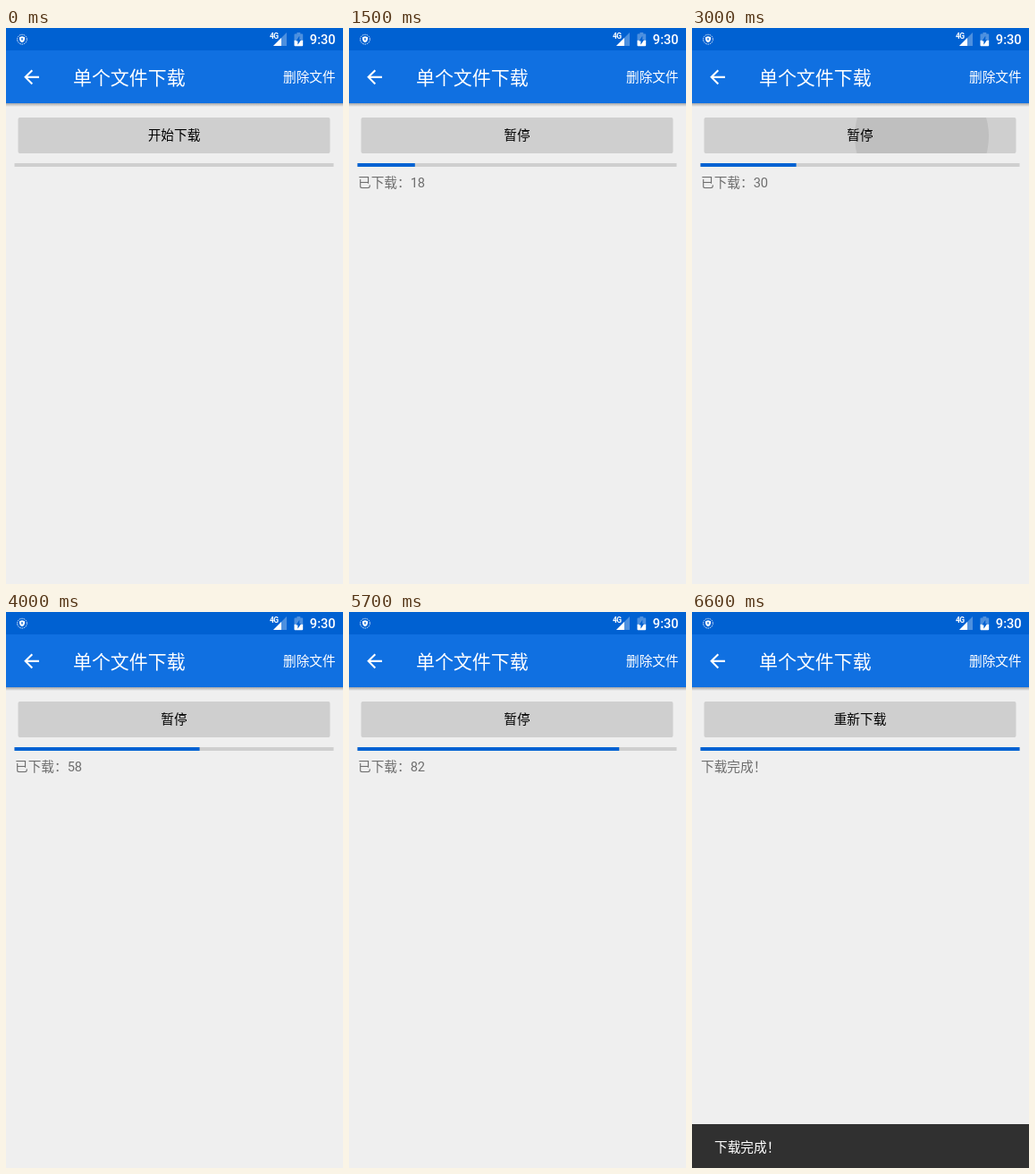
An HTML page that plays this animation: 377 px wide and 621 px high, repeating every 6.7 s.

```html
<!DOCTYPE html>
<html lang="zh-CN">
<head>
<meta charset="utf-8">
<title>单个文件下载</title>
<style>
  html, body { margin: 0; width: 100%; height: 100%; overflow: hidden; background: #efefef; }
  svg { display: block; width: 377px; height: 621px; }
  text { font: 14.66px Roboto, "Noto Sans CJK SC", "Noto Sans CJK", sans-serif; }
  .white { fill: #fff; }
  .faint { fill: #fff; opacity: .3; }
  #title { font-size: 20.94px; }
  #clock { font-weight: 500; }
  #net { font-size: 8.5px; font-weight: 700; letter-spacing: -.7px; }
  #label { font-weight: 500; text-anchor: middle; }
  #status { fill: #6e6e6e; }
</style>
</head>
<body>
<svg viewBox="0 0 377 621">
  <defs>
    <linearGradient id="shade" x2="0" y2="1">
      <stop offset="0" stop-opacity=".3"/>
      <stop offset="1" stop-opacity="0"/>
    </linearGradient>
    <clipPath id="face"><rect x="13.5" y="100" width="349" height="40" rx="2"/></clipPath>
  </defs>
  <rect width="377" height="621" fill="#efefef"/>

  <!-- status bar -->
  <rect width="377" height="25" fill="#0061d2"/>
  <circle cx="18" cy="12.7" r="5.4" fill="none" stroke="#fff" stroke-opacity=".8" stroke-dasharray="1.6 .8"/>
  <path class="white" d="M18 9.2l3 1.1v2.3q0 2.4-3 3.7q-3-1.3-3-3.7v-2.3z"/>
  <path d="M18 11v3M16.8 12.2h2.4" stroke="#0061d2" stroke-width=".8"/>
  <path class="faint" d="M314 5v15h-15z"/>
  <path class="white" d="M308 11v9h-9z"/>
  <text id="net" class="white" x="295" y="12">4G</text>
  <g transform="translate(315.7 3.5) scale(.97 .76)">
    <path class="faint" d="M17 5.33C17 4.6 16.4 4 15.67 4H14V2h-4v2H8.33C7.6 4 7 4.6 7 5.33v8.17h2.53L13 7v5.5h2l-.53 1H17z"/>
    <path class="white" d="M14.47 13.5L11 20v-5.5H9l.53-1H7v7.17C7 21.4 7.6 22 8.33 22h7.33c.74 0 1.34-.6 1.34-1.33V13.5z"/>
  </g>
  <text id="clock" class="white" x="339.8" y="18.2">9:30</text>

  <!-- toolbar -->
  <rect y="25" width="377" height="59" fill="#1070e1"/>
  <rect y="84" width="377" height="4" fill="url(#shade)"/>
  <path class="white" transform="translate(16 42.3) scale(1.047)"
        d="M20 11H7.83l5.59-5.59L12 4l-8 8 8 8 1.41-1.41L7.83 13H20z"/>
  <text id="title" class="white" x="75" y="62.6">单个文件下载</text>
  <text class="white" x="310" y="60.2">删除文件</text>

  <!-- download controls -->
  <g clip-path="url(#face)">
    <rect id="button" x="13" y="100" width="350" height="40" fill="#cfcfcf"/>
    <circle id="ripple" cx="257" cy="121" r="75" fill="#bfbfbf"/>
  </g>
  <text id="label" x="188" y="125.2"></text>
  <rect x="9.5" y="151" width="357" height="4" fill="#cfcfcf"/>
  <rect id="bar" x="9.5" y="151" width="0" height="4" fill="#0062d2"/>
  <text id="status" x="10" y="177.5"></text>

  <g id="snack">
    <rect y="572" width="377" height="49" fill="#303030"/>
    <text class="white" x="25" y="602.5">下载完成！</text>
  </g>
</svg>
<script>
  const LOOP = 6700, STEP = 100, DONE = 6300;
  const $ = id => document.getElementById(id);
  const within = (t, a, b) => t >= a && t < b;

  // Each run: start time, first percent, last percent, percent per step
  const runs = [[900, 0, 30, 3], [3000, 30, 64, 2.8], [5200, 64, 100, 3.6]];
  const slide = { 6400: 36, 6500: 2, 6600: 0 };

  function percent(t) {
    const run = runs.filter(r => t >= r[0]).pop();
    if (!run) return 0;
    const [start, from, to, rate] = run;
    return Math.min(to, Math.round(from + (t - start) / STEP * rate));
  }

  function label(t) {
    if (t < 900) return '开始下载';
    if (t >= DONE) return '重新下载';
    return within(t, 2000, 3000) || within(t, 4200, 5200) ? '继续' : '暂停';
  }

  function status(t) {
    if (t < 900) return '';
    return t >= DONE ? '下载完成！' : '已下载：' + percent(t);
  }

  function draw(t) {
    const pressed = within(t, 2600, 3000) || within(t, 4700, 5200);
    const released = within(t, 3000, 3100) || within(t, 5200, 5300);
    $('label').textContent = label(t);
    $('status').textContent = status(t);
    $('bar').setAttribute('width', percent(t) * 3.57);
    $('button').setAttribute('fill', pressed ? '#cacaca' : '#cfcfcf');
    $('ripple').style.display = released ? '' : 'none';
    $('snack').setAttribute('transform', `translate(0 ${slide[t] ?? 60})`);
  }

  const begin = performance.now();
  function tick() {
    const t = (performance.now() - begin) % LOOP;
    draw(Math.floor(t / STEP) * STEP);
    requestAnimationFrame(tick);
  }
  tick();
</script>
</body>
</html>
```
